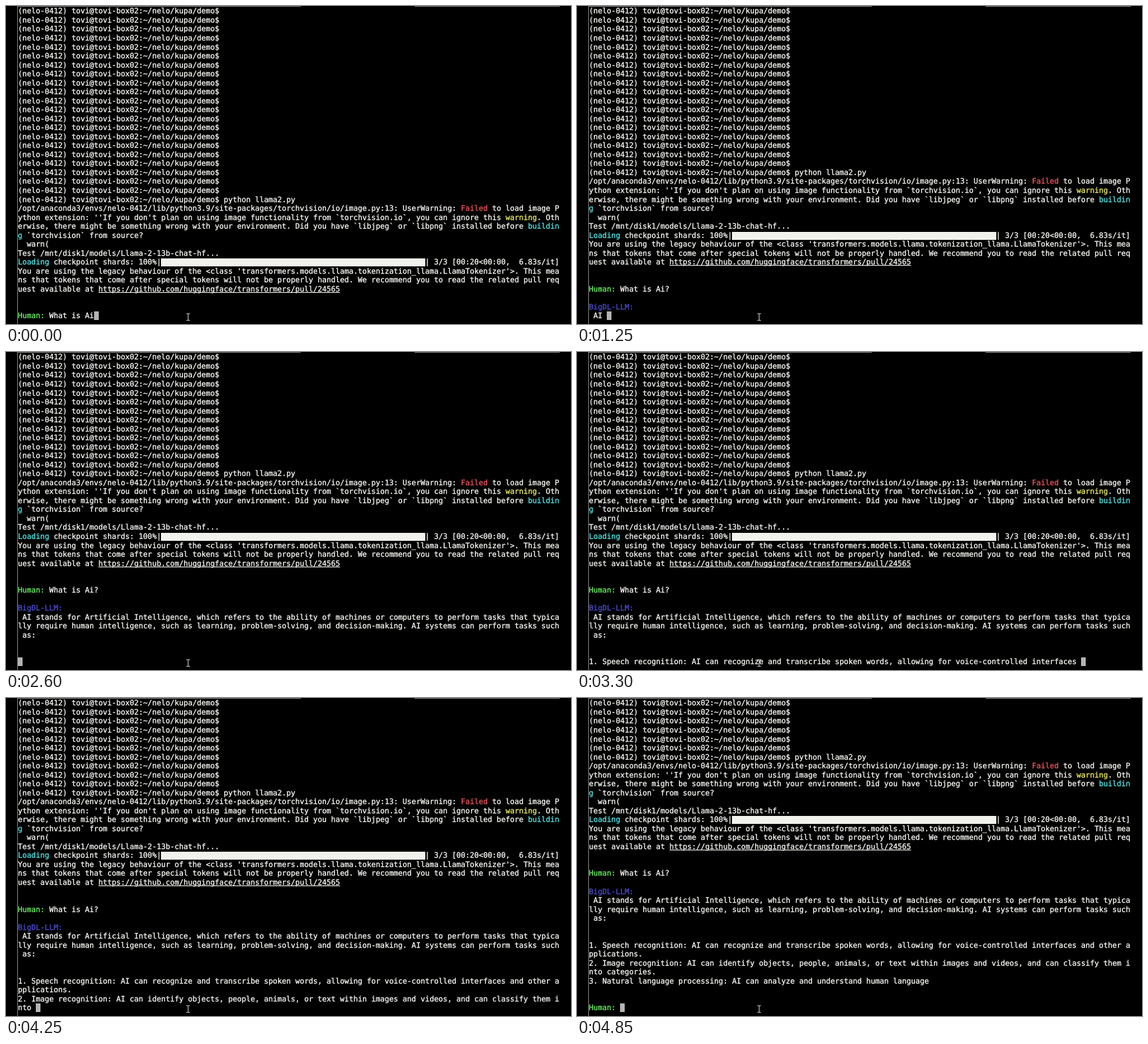
An HTML page for the animation above (5.25 s loop, 853 by 480 pixels).

```html
<!DOCTYPE html>
<html lang="en">
<head>
<meta charset="utf-8">
<title>Terminal chat</title>
<style>
  html, body { margin: 0; width: 100%; height: 100%; overflow: hidden; background: #000; }
  #stage { position: absolute; left: 0; top: 0; width: 853px; height: 480px; overflow: hidden; }
  pre {
    position: absolute; left: 18px; top: 1.4px; margin: 0; color: #fafaf6;
    font: 11.22px/13.53px "DejaVu Sans Mono", monospace;
    text-rendering: geometricPrecision; font-variant-ligatures: none;
    -webkit-text-stroke: .3px;
  }
  svg { position: absolute; left: 0; top: 0; }
  u { text-decoration-thickness: 1px; text-decoration-skip-ink: none; }
  .cyan { color: #4fe8e8; }
  .red { color: #f0565c; }
  .yellow { color: #f0f060; }
  .green { color: #68f060; }
  .blue { color: #4c4cd0; }
  .bar, .cursor { display: inline-block; height: 12px; line-height: 12px; background: #f2f2ec; }
  .cursor { height: 13px; line-height: 13px; background: #b4b4b4; }
</style>
</head>
<body>
<div id="stage">
  <pre id="screen"></pre>
  <svg width="853" height="480" fill="none">
    <path d="M17.5 0V480M17 .5H445M617 .5H836" stroke="#858585"/>
    <path d="M272.5 464.5h2l.5 .5 .5-.5h2M275 465v9M272.5 474.5h2l.5-.5 .5 .5h2" stroke="#e4e4e4"/>
  </svg>
</div>
<script type="text/plain" id="startup">
 python llama2.py
/opt/anaconda3/envs/nelo-0412/lib/python3.9/site-packages/torchvision/io/image.py:13: UserWarning: Failed to load image Python extension: ''If you don't plan on using image functionality from `torchvision.io`, you can ignore this warning. Otherwise, there might be something wrong with your environment. Did you have `libjpeg` or `libpng` installed before building `torchvision` from source?
  warn(
Test /mnt/disk1/models/Llama-2-13b-chat-hf...
Loading checkpoint shards: 100%|#| 3/3 [00:20<00:00,  6.83s/it]
You are using the legacy behaviour of the <class 'transformers.models.llama.tokenization_llama.LlamaTokenizer'>. This means that tokens that come after special tokens will not be properly handled. We recommend you to read the related pull request available at https://github.com/huggingface/transformers/pull/24565


Human: What is Ai
</script>
<script type="text/plain" id="reply">
AI stands for Artificial Intelligence, which refers to the ability of machines or computers to perform tasks that typically require human intelligence, such as learning, problem-solving, and decision-making. AI systems can perform tasks such as:


1. Speech recognition: AI can recognize and transcribe spoken words, allowing for voice-controlled interfaces and other applications.
2. Image recognition: AI can identify objects, people, animals, or text within images and videos, and can classify them into categories.
3. Natural language processing: AI can analyze and understand human language
</script>
<script>
const LOOP = 5250, STEP = 50, COLS = 121, ROWS = 35;
const terminal = document.getElementById('screen');
const read = id => document.getElementById(id).textContent.replace(/^\n|\n$/g, '');

const shellPrompt = '(nelo-0412) tovi@tovi-box02:~/nelo/kupa/demo$';
const startup = (shellPrompt + '\n').repeat(21) + shellPrompt +
  read('startup').replace('#', '█'.repeat(59));
const words = read('reply').match(/\S+\s*/g);

// [time in ms, words printed so far]
const pace = [[1200, 1], [1250, 1], [2150, 25], [2600, 35], [3650, 56], [4250, 72], [4800, 84]];

function wordCount(t) {
  if (t < pace[0][0]) return 0;
  for (let i = 1; i < pace.length; i++) {
    const [t0, n0] = pace[i - 1], [t1, n1] = pace[i];
    if (t <= t1) return Math.floor(n0 + (n1 - n0) * (t - t0) / (t1 - t0) + 1e-6);
  }
  return words.length;
}

function transcript(t) {
  let text = startup;
  if (t >= 300) text += '?';
  if (t >= 700) text += '\n\nBigDL-LLM:\n';
  const n = wordCount(t);
  if (n) text += ' ' + words.slice(0, n).join('');
  if (t >= 4850) text += '\n\n\nHuman: ';
  return text + '▮';
}

const wrap = text => text.split('\n').flatMap(
  line => line.match(new RegExp(`.{1,${COLS}}`, 'g')) || ['']);

const span = (name, text = '$&') => `<span class="${name}">${text}</span>`;

const highlight = text => text
  .replace(/&/g, '&amp;').replace(/</g, '&lt;').replace(/>/g, '&gt;')
  .replace(/Failed/, span('red'))
  .replace(/warning/, span('yellow'))
  .replace(/buildin\s*g|Loading/g, span('cyan'))
  .replace(/https:\S+/, '<u>$&</u>')
  .replace(/Human:/g, span('green'))
  .replace(/BigDL-LLM:/, span('blue'))
  .replace(/█+/, bar => span('bar', ' '.repeat(bar.length)))
  .replace('▮', span('cursor', ' '));

let shown = '';
function draw() {
  const t = Math.floor(performance.now() % LOOP / STEP) * STEP;
  const html = highlight(wrap(transcript(t)).slice(-ROWS).join('\n'));
  if (html !== shown) terminal.innerHTML = shown = html;
  requestAnimationFrame(draw);
}
draw();
</script>
</body>
</html>
```
